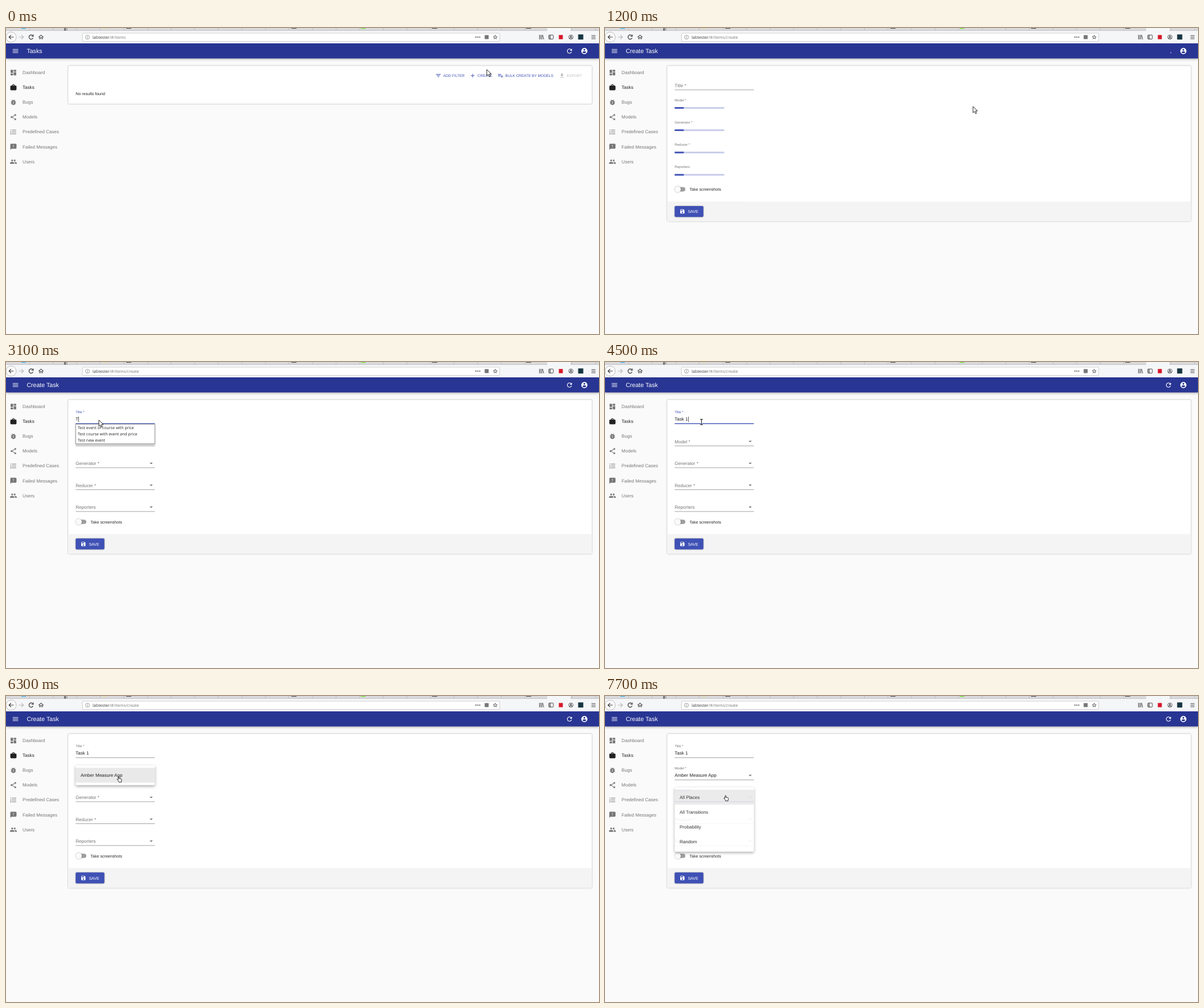
These frames come from a looping animation (1041x538 px, 8000 ms). An HTML page:

```html
<!DOCTYPE html>
<html lang="en">
<head>
<meta charset="utf-8">
<title>Create task</title>
<style>
html, body { margin: 0; width: 100%; height: 100%; overflow: hidden; background: #fafafa; }
svg { display: block; width: 100vw; height: 100vh; }
text { font-family: "Liberation Sans", Arial, sans-serif; text-rendering: geometricPrecision; white-space: pre; }
.ui { font-family: "Open Sans", "Noto Sans", sans-serif; }
.card { filter: drop-shadow(0 .6px .9px rgba(0,0,0,.38)); }
.menu { filter: drop-shadow(0 2px 2.5px rgba(0,0,0,.36)); }
.popup { filter: drop-shadow(0 1px 1px rgba(0,0,0,.45)); }
</style>
</head>
<body>
<svg viewBox="0 0 1041 538">
  <g id="chrome"></g>
  <g id="scene"></g>
  <g id="cursor"></g>
</svg>
<script>
const LOOP = 8000, STEP = 100;
const BLUE = '#3f51b5', NAVY = '#283593', GREY = '#757575', INK = '#212121';
const BAR = '#4a4a4f';
const MODEL = 'Amber Measure App';
const $ = id => document.getElementById(id);

const text = (x, y, s, size = 8.05, fill = GREY, attrs = '') =>
  `<text x="${x}" y="${y}" font-size="${size}" fill="${fill}" ${attrs}>${s}</text>`;
const rect = (x, y, w, h, fill, attrs = '') =>
  `<rect x="${x}" y="${y}" width="${w}" height="${h}" fill="${fill}" ${attrs}/>`;
const circle = (x, y, r, fill, attrs = '') =>
  `<circle cx="${x}" cy="${y}" r="${r}" fill="${fill}" ${attrs}/>`;
const stroke = (d, color, width = 1, attrs = '') =>
  `<path d="${d}" fill="none" stroke="${color}" stroke-width="${width}" ${attrs}/>`;
// Icons are drawn on a 24 unit grid and centred on (x, y).
const icon = (name, x, y, size, fill) => {
  const k = size / 24;
  return `<path d="${ICONS[name]}" fill="${fill}" fill-rule="evenodd"
    transform="translate(${x - size / 2} ${y - size / 2}) scale(${k})"/>`;
};
const dot = (x, y, r) => `M${x - r} ${y}a${r} ${r} 0 1 0 ${2 * r} 0a${r} ${r} 0 1 0 ${-2 * r} 0z`;

const ICONS = {
  menu: 'M3 18h18v-2H3zM3 13h18v-2H3zM3 6v2h18V6z',
  dashboard: 'M3 13h8V3H3zM3 21h8v-6H3zM13 21h8V11h-8zM13 3v6h8V3z',
  work: 'M20 6h-4V4l-2-2h-4L8 4v2H4L2 8v11l2 2h16l2-2V8zM14 6h-4V4h4z',
  bug: 'M20 8h-2.8l-1.8-2L17 4.4 15.6 3l-2.2 2.2h-2.8L8.4 3 7 4.4 8.6 6 6.8 8H4v2h2v2H4v2h2v2H4v2h2.8q1.7 3 5.2 3t5.2-3H20v-2h-2v-2h2v-2h-2v-2h2zM14 16h-4v-2h4zM14 12h-4v-2h4z',
  share: dot(18, 5, 3) + dot(6, 12, 3) + dot(18, 19, 3) + 'M8 10l8-4.7 1 1.7-8 4.7zM9 12.4l8 4.6-1 1.7-8-4.6z',
  list: 'M2 17h2v.5H3v1h1v.5H2v1h3v-4H2zM3 8h1V4H2v1h1zM2 11h1.8L2 13.1v.9h3v-1H3.2L5 10.9V10H2zM7 5v2h14V5zM7 19h14v-2H7zM7 13h14v-2H7z',
  failed: 'M20 2H4L2 4v18l4-4h14l2-2V4zM13 14h-2v-2h2zM13 10h-2V6h2z',
  people: dot(16, 8, 3) + dot(8, 8, 3) + 'M8 13c-2.3 0-7 1.2-7 3.5V19h14v-2.5c0-2.3-4.7-3.5-7-3.5zM16 13h-1c1.2.9 2 2 2 3.5V19h6v-2.5c0-2.3-4.7-3.5-7-3.5z',
  refresh: 'M17.65 6.35A8 8 0 1 0 19.73 14h-2.08a6 6 0 1 1-1.43-6.22L13 11h7V4z',
  account: dot(12, 12, 10) + dot(12, 8, 3) + 'M12 19.2c-2.5 0-4.7-1.3-6-3.2 0-2 4-3.1 6-3.1s6 1.1 6 3.1c-1.3 1.9-3.5 3.2-6 3.2z',
  save: 'M17 3H5L3 5v14l2 2h14l2-2V7zM15 9H5V5h10z' + dot(12, 16, 3),
  filter: 'M10 18h4v-2h-4zM3 6v2h18V6zM6 13h12v-2H6z',
  add: 'M19 13h-6v6h-2v-6H5v-2h6V5h2v6h6z',
  bulk: 'M14 10H2v2h12zM14 6H2v2h12zM18 14v-4h-2v4h-4v2h4v4h2v-4h4v-2zM2 16h8v-2H2z',
  download: 'M19 9h-4V3H9v6H5l7 7zM5 18v2h14v-2z',
  drop: 'M7 10l5 5 5-5z',
  home: 'M12 2L1 12l1.5 1.6L4.5 12v9H10v-6h4v6h5.5v-9l2 1.6L23 12zM12 5l5.3 4.8V19H16v-6H8v6H6.700V9.800z',
  star: 'M12 2l3 7 7.500.7-5.700 5 1.700 7.300L12 18l-6.500 4 1.700-7.300-5.700-5L9 9zM12 6.500l-1.700 4-4.200.4 3.200 2.800-1 4.200 3.700-2.300 3.700 2.300-1-4.200 3.200-2.800-4.200-.4z'
};

function browser() {
  let s = rect(0, 0, 1041, 27, '#f5f6f7') + rect(0, 0, 1041, 4.5, '#dadadc');
  for (let x = 41; x < 1041; x += 41.4) s += rect(x, 0, .7, 4, '#b4b4b6');
  s += rect(0, 4, 1041, .8, '#bcbcbe') + rect(950, 0, 41, 5, '#f5f6f7');
  s += rect(102, 0, 3, 5, '#77777a') + rect(105, 0, 3, 5, '#b5b5b8');
  s += rect(27, 0, 8, 1.5, '#58b7e8') + rect(170, 0, 7, 1, '#e6d98a') + rect(623, 0, 8, 1.5, '#7ee04a');
  for (const x of [211, 501, 748, 913]) s += rect(x, 0, 9, 1.2, '#55555a');
  s += circle(9, 16, 9, '#fcfcfc', 'stroke="#a9a9ab" stroke-width=".8"');
  s += stroke('M13.500 16H5.500M9 12.300L5.300 16 9 19.700', '#38383d', 1.2);
  s += stroke('M22.500 16H30.500M27 12.300L30.700 16 27 19.700', '#b8b8bb', 1.2);
  s += stroke('M47.300 13.700A3.800 3.800 0 1 0 47.600 17.600', '#38383d', 1.2) + stroke('M48 11.500V14.800H44.700', '#38383d', 1.1);
  s += icon('home', 61.5, 15.8, 9.8, '#38383d');
  s += rect(134.3, 9, 732.4, 14.6, '#fff', 'rx="1.600" stroke="#c4c4c6" stroke-width=".8"');
  s += circle(143, 16.2, 3.6, 'none', 'stroke="#77777a" stroke-width=".7"') + rect(142.6, 15.6, .9, 2.6, GREY) + rect(142.6, 14, .9, .9, GREY);
  for (const x of [825, 828.3, 831.6]) s += circle(x, 16, 1.05, BAR);
  s += rect(840.3, 12.5, 7, 7, '#77777a');
  s += icon('star', 858.8, 15.8, 9.5, BAR);
  for (const x of [936, 938.2, 940.4]) s += rect(x, 12, 1, 8, BAR);
  s += stroke('M942 12.200L944 20', BAR);
  s += rect(952.8, 12.3, 8, 7.2, 'none', `rx="1" stroke="${BAR}"`) + rect(953.3, 13, 3, 6, '#8a8a8e');
  s += rect(970.5, 12.3, 7, 7.4, '#d7182a');
  s += circle(991.7, 16, 3.8, 'none', `stroke="${BAR}" stroke-width=".9"`) + circle(991.7, 15, 1.4, BAR) + stroke('M989.200 18.400Q991.700 16 994.200 18.400', BAR, 1.2);
  s += rect(1004.4, 11.3, 9, 9, '#173541');
  for (const y of [12.8, 15.6, 18.4]) s += rect(1027.7, y, 7.2, 1, BAR);
  return s;
}

function frame() {
  const items = [['dashboard', 'Dashboard'], ['work', 'Tasks'], ['bug', 'Bugs'], ['share', 'Models'],
    ['list', 'Predefined Cases'], ['failed', 'Failed Messages'], ['people', 'Users']];
  let s = rect(0, 27, 1041, 26.5, NAVY, 'style="filter:drop-shadow(0 1.500px 2px rgba(0,0,0,.35))"');
  s += browser();
  s += icon('menu', 16.6, 40.5, 13, '#fff') + icon('account', 1015.3, 40.5, 13, '#fff');
  items.forEach(([name, label], i) => {
    const y = 78.2 + 26.1 * i, fill = i === 1 ? INK : GREY;
    s += icon(name, 13, y + .2, 13, fill) + text(29.1, y + 2.8, label, 8.05, fill);
  });
  return s;
}

const heading = (title, path) =>
  text(36.4, 44, title, 10.6, '#fff') +
  `<text class="ui" x="152" y="18.700" font-size="7.200" fill="#38383d">labtester<tspan fill="#77777a">${path}</tspan></text>`;

const card = bottom => rect(109.2, 66.5, 919.3, bottom - 66.5, '#fff', 'rx="2" class="card"');

function listPage(t) {
  const hover = t < 200 ? 0 : t < 300 ? .04 : .08;
  const ripple = t < 700 ? 0 : (t - 600) / 400;
  let s = heading('Tasks', '/#/items') + icon('refresh', 989.2, 40.5, 13, '#fff') + card(133.2);
  s += rect(813, 74.5, 45.5, 18.5, BLUE, `rx="2" opacity="${hover}"`);
  if (ripple) s += `<svg x="813" y="74.500" width="45.500" height="18.500">${circle(22, 14, 24 * ripple, BLUE, 'opacity=".2"')}</svg>`;
  const buttons = [['filter', 759, 767.6, 'ADD FILTER'], ['add', 819.2, 827.8, 'CREATE'],
    ['bulk', 868.3, 876.6, 'BULK CREATE BY MODELS'], ['download', 976, 984.5, 'EXPORT']];
  for (const [name, ix, x, label] of buttons) {
    const fill = label === 'EXPORT' ? '#bdbdbd' : BLUE;
    s += icon(name, ix, 83.8, 10.9, fill) + text(x, 86.1, label, 6.5, fill);
  }
  return s + text(122.3, 117.6, 'No results found', 7.1, INK);
}

const underline = (y, mode) =>
  mode === 'focus' ? rect(122.3, y - .9, 139, 1.4, BLUE)
  : mode === 'hover' ? rect(122.3, y - .8, 139, 1.2, INK)
  : rect(122.3, y - .4, 139, .8, '#8c8c8c');

const smallLabel = (y, s, focus) => text(122.3, y, s, 6.05, focus ? BLUE : GREY);

function formBase(bottom) {
  const y = bottom - 56.2;
  return card(bottom) + rect(109.2, bottom - 34.6, 919.3, 34.6, '#f4f4f4', 'rx="1"') +
    rect(126, y - 3.8, 15, 7.6, '#9e9e9e', 'rx="3.800"') +
    circle(127.8, y, 5.3, '#fafafa', 'class="card"') +
    text(148.5, y + 2.5, 'Take screenshots', 7.1, INK) +
    rect(122.3, bottom - 26.9, 50.4, 19.3, BLUE, 'rx="2" class="card"') +
    icon('save', 135.8, bottom - 17.2, 10, '#fff') + text(145.4, bottom - 14.7, 'SAVE', 7.1, '#fff');
}

function loadingPage(t) {
  const age = t - 1100, e = age / 1260 * 1.22;
  const left = Math.max(0, -.35 + 1.35 * e), right = Math.max(0, 1.9 * e);
  const grow = Math.min(1, age / 700), arc = .4 + 24 * grow * grow * (3 - 2 * grow);
  let s = heading('Create Task', '/#/items/create') + formBase(339.8);
  s += stroke('M994.200 40.500a5 5 0 1 1-10 0a5 5 0 1 1 10 0', '#fff', 1,
    `stroke-dasharray="${arc} 40" transform="rotate(${age * 360 / 1400} 989.200 40.500)"`);
  s += text(122.3, 104.1, 'Title *') + underline(108.8);
  ['Model *', 'Generator *', 'Reducer *', 'Reporters'].forEach((label, i) => {
    const y = 140.5 + 39.2 * i;
    s += smallLabel(y - 12, label) + rect(122.3, y - 1.4, 87, 2.8, '#c5cae9');
    s += rect(122.3 + 87 * left, y - 1.4, 87 * Math.max(0, right - left), 2.8, BLUE);
  });
  return s;
}

const pick = (table, t) => table.filter(row => row[0] <= t).pop();

// time, typed text, caret position or 0
const TYPED = [[0, '', 0], [2500, '', 122.8], [3100, 'T', 127.3], [3400, 'Tas', 135],
  [3800, 'Task ', 141.2], [4100, 'Task 1', 146], [4800, 'Task 1', 0]];

function titleField(t) {
  const focus = t >= 2400 && t < 5600;
  const [, typed, caret] = pick(TYPED, t);
  let s = underline(108.6, t > 2400 && focus ? 'focus' : t >= 1700 && t < 2500 ? 'hover' : '');
  if (t < 2400) return s + text(122.3, 104.1, 'Title *');
  if (t < 2500) return s + text(122.3, 96.5, 'Title *', 6.9, BLUE) + rect(157, 107.7, 70, 1.4, BLUE);
  s += smallLabel(90, 'Title *', focus) + text(122.3, 103.4, typed, 8.05, INK);
  return caret ? s + rect(caret, 96.2, .7, 9.3, '#111') : s;
}

function popup(rows) {
  let s = rect(122.6, 109.3, 138.5, 1.8 + 10.9 * rows.length, '#fff', 'stroke="#9a9a9a" stroke-width=".800" class="popup"');
  rows.forEach((row, i) => s += text(126, 118.1 + 10.9 * i, row, 6.97, INK, 'class="ui"'));
  return s;
}

function menu(y, items, opacity) {
  let s = rect(122.3, y, 139.2, 8.7 + 26.1 * items.length, '#fff', 'rx="2" class="menu"');
  s += rect(122.3, y + 4.3, 139.2, 26.1, '#e9e9e9');
  items.forEach((item, i) => s += text(131, y + 20.1 + 26.1 * i, item, 8.05, INK));
  return `<g opacity="${opacity}">${s}</g>`;
}

function formPage(t) {
  const chosen = t >= 6800;
  let s = heading('Create Task', '/#/items/create') + icon('refresh', 989.2, 40.5, 13, '#fff');
  s += formBase(337.2) + titleField(t);
  const modes = [t >= 5600 && t < 7700 ? 'focus' : t >= 5200 && t < 5600 ? 'hover' : '',
    t >= 7700 ? 'focus' : t >= 7300 ? 'hover' : '', '', ''];
  ['Model *', 'Generator *', 'Reducer *', 'Reporters'].forEach((label, i) => {
    const y = 139.8 + 38.5 * i, focus = modes[i] === 'focus';
    if (i === 0 && chosen) s += smallLabel(128.6, label, focus) + text(122.3, 142, MODEL, 8.05, INK);
    else if (i === 1 && focus) s += smallLabel(y - 11, label, true);
    else s += text(122.3, y + 2.8, label, 8.05, focus ? BLUE : GREY);
    s += icon('drop', 254.9, y - .2, 13, GREY) + underline(y + 7.6, modes[i]);
  });
  if (t >= 3100 && t < 3400) s += popup(['Test event of course with price', 'Test course with event and price', 'Test new event']);
  if (t >= 3400 && t < 3800) s += popup(['First task']);
  if (t >= 5900 && t < 7300) s += menu(122, [MODEL], t < 6300 ? .96 : t < 6800 ? 1 : .9);
  if (t >= 7700) s += menu(160.6, ['All Places', 'All Transitions', 'Probability', 'Random'], .9);
  return s;
}

const POINTERS = {
  arrow: '<path d="M0 0V11L2.600 8.700 4.500 12.700 6.300 11.900 4.500 7.900H8z" fill="#fff" stroke="#111" stroke-width=".9"/>',
  hand: '<path d="M1.800 7L.2 5.300Q.3 4 1.800 4.700L2.300 5V1Q3.200-.2 4 1V3.700L7.300 4.300Q8.300 4.700 8 6L7.400 9.900H3.300z" fill="#fff" stroke="#111" stroke-width=".9"/>',
  beam: stroke('M-2.300-4.600H2.300M-2.300 4.600H2.300M0-4.600V4.600', '#fff', 2.2) + stroke('M-2.300-4.600H2.300M-2.300 4.600H2.300M0-4.600V4.600', '#222', 1.1)
};

// time, x, y, pointer
const PATH = [[0, 844, 73, 'arrow'], [200, 841, 77, 'hand'], [300, 838, 82, 'hand'], [400, 836, 86, 'hand'],
  [500, 834, 88, 'hand'], [900, 826, 92, 'hand'], [1000, 788, 104, 'arrow'], [1100, 714, 124, 'arrow'],
  [1200, 646, 138, 'arrow'], [1300, 622, 139, 'arrow'], [1400, 608, 138, 'arrow'], [1500, 602, 137, 'arrow'],
  [1600, 350, 118, 'arrow'], [1700, 189, 104, 'beam'], [2000, 176, 104, 'beam'], [2100, 165, 104, 'beam'],
  [3100, 163, 102, 'arrow'], [4500, 169.4, 105.5, 'beam'], [4800, 206, 127, 'arrow'], [5200, 211, 136, 'hand'],
  [6300, 195, 141.5, 'hand'], [7300, 208.5, 174.5, 'hand']];

$('chrome').innerHTML = frame();
const start = performance.now();
let shown = -1;

function tick() {
  const t = Math.floor((performance.now() - start) % LOOP / STEP) * STEP;
  if (t !== shown) {
    shown = t;
    $('scene').innerHTML = (t < 1100 ? listPage : t < 1500 ? loadingPage : formPage)(t);
    const [, x, y, kind] = pick(PATH, t);
    $('cursor').innerHTML = `<g transform="translate(${x} ${y})">${POINTERS[kind]}</g>`;
  }
  requestAnimationFrame(tick);
}
tick();
</script>
</body>
</html>
```
